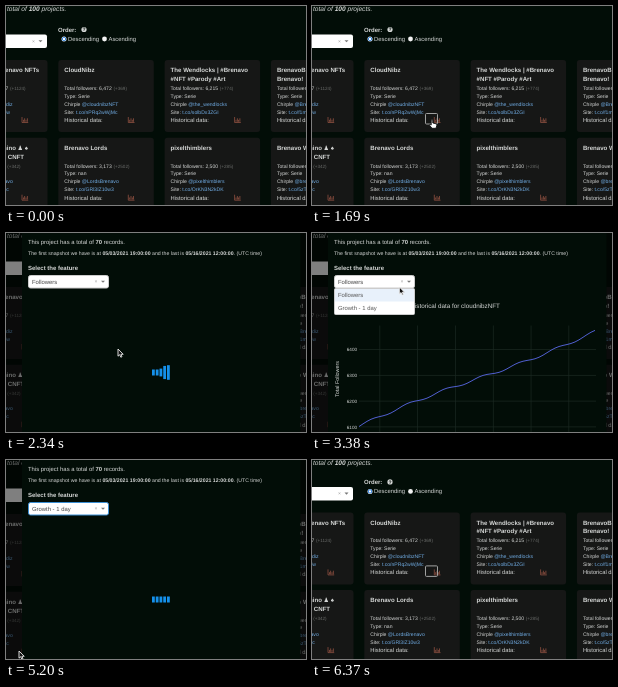
Recreate the animation shown at these times as an HTML page with a canvas. Size 300 by 199 pixels, loop 6500 ms.

```html
<!DOCTYPE html>
<html lang="en">
<head>
<meta charset="utf-8">
<title>Project follower history</title>
<style>
  html, body { margin: 0; width: 100%; height: 100%; overflow: hidden; background: #020d07; }
  canvas { display: block; width: 300px; height: 199px; }
</style>
</head>
<body>
<canvas id="stage"></canvas>
<script>
const W = 300, H = 199, LOOP = 6500, STEP = 130;
const BG = '#020d07', INK = '#d6d8d7', LINK = '#72afe8', LINE = '#505fd0', GRID = '#1b2922';
const FONT = '"Liberation Sans", "DejaVu Sans", sans-serif';
const ratio = Math.max(1, window.devicePixelRatio || 1);

function makeLayer(canvas) {
  canvas.width = W * ratio;
  canvas.height = H * ratio;
  const c = canvas.getContext('2d');
  c.scale(ratio, ratio);
  c.textRendering = 'geometricPrecision';
  return c;
}
const screen = makeLayer(document.getElementById('stage'));
const layer = makeLayer(document.createElement('canvas'));
let g = screen;

const clamp = v => Math.min(1, Math.max(0, v));
const easeOut = p => 1 - (1 - p) ** 2;
const smooth = p => p * p * (3 - 2 * p);
const range = (n, f) => Array.from({ length: n }, (_, i) => f(i));

// ---- drawing helpers ----
function text(s, x, y, size, color = INK, style = '') {
  g.font = `${style} ${size}px ${FONT}`;
  g.fillStyle = color;
  g.fillText(s, x, y);
  return x + g.measureText(s).width;
}
// Parts between asterisks are bold.
function rich(s, x, y, size, style = '') {
  s.split('*').forEach((part, i) => {
    x = text(part, x, y, size, INK, i % 2 ? style + ' bold' : style);
  });
}
function rect(x, y, w, h, color) {
  g.fillStyle = color;
  g.fillRect(x, y, w, h);
}
function round(x, y, w, h, r, fill, stroke) {
  g.beginPath();
  g.roundRect(x, y, w, h, r);
  if (fill) { g.fillStyle = fill; g.fill(); }
  if (stroke) { g.strokeStyle = stroke; g.lineWidth = 1; g.stroke(); }
}
function dot(x, y, r, color) {
  g.beginPath();
  g.arc(x, y, r, 0, 7);
  g.fillStyle = color;
  g.fill();
}
function path(points, color, width) {
  g.beginPath();
  points.forEach(([x, y]) => g.lineTo(x, y));
  g.strokeStyle = color;
  g.lineWidth = width;
  g.lineJoin = 'round';
  g.stroke();
}
function selectIcons(x, y) {
  text('×', x, y + 1.7, 5, '#999');
  g.beginPath();
  g.moveTo(x + 6.5, y - .8);
  g.lineTo(x + 10.5, y - .8);
  g.lineTo(x + 8.5, y + 1.3);
  g.fillStyle = '#777';
  g.fill();
}

// ---- page: two rows of four cards ----
const cards = [
  ['Marketplaces Brenavo NFTs', '', '12,057', '(+1124)', 'Serie', '@brenavolandiz', 't.co/K8mVq41rTw'],
  ['CloudNibz', '', '6,472', '(+369)', 'Serie', '@cloudnibzNFT', 't.co/nPRq2wWjMc'],
  ['The Wendlocks | #Brenavo', '#NFT #Parody #Art', '6,215', '(+774)', 'Serie', '@the_wendlocks', 't.co/solbDx3ZGI'],
  ['BrenavoBarn', 'Brenavo!', '5,208', '', 'Serie', '@BrenavoBarn', 't.co/f1mQz7RkLp'],
  ['The Gallery Brenino ♟ ♠', 'Traders Brenavo CNFT', '3,356', '(+342)', 'Serie', '@clubofbrenavo', 't.co/Wb27xLdync'],
  ['Brenavo Lords', '', '3,173', '(+2502)', 'nan', '@LordsBrenavo', 't.co/GRl3IZ10w3'],
  ['pixelthimblers', '', '2,500', '(+285)', 'Serie', '@pixelthimblers', 't.co/OrKN3N2kDK'],
  ['Brenavo Wharf', '', '2,214', '', 'Serie', '@brenavowharf', 't.co/5zTq8HnVsa'],
];
function chartIcon(x, y) {
  path([[x - 3, y - 3], [x - 3, y + 2.5], [x + 3.2, y + 2.5]], '#8f5040', .8);
  for (let i = 0; i < 4; i++) {
    const h = 2 + i % 2 * 1.5;
    rect(x - 2 + i * 1.3, y + 1.8 - h, .8, h, '#8f5040');
  }
}
function card([title, title2, count, delta, type, user, site], i) {
  g.save();
  g.translate(-54 + i % 4 * 106.3, 54 + (i > 3 ? 77.7 : 0));
  round(0, 0, 95.5, 72, 3, '#161716');
  text(title, 6, 12.4, 6.1, INK, 'bold');
  text(title2, 6, 20.9, 6.1, INK, 'bold');
  const end = text('Total followers: ' + count, 6, 29.8, 5.05);
  text(delta, end + 1.8, 29.8, 4.6, '#6a6c6a');
  text('Type: ' + type, 6, 37.7, 5.05);
  text(user, text('Chirple ', 6, 45.6, 5.1), 45.6, 5.1, LINK);
  text(site, text('Site: ', 6, 53.5, 5.1), 53.5, 5.1, LINK);
  text('Historical data:', 6, 62, 5.8);
  chartIcon(73, 60);
  g.restore();
}
function page(focused, lift) {
  rect(0, 0, W, H, BG);
  rich('total of *100* projects.', 1, 5.2, 6.6, 'italic');
  g.save();
  g.translate(0, -lift);
  text('Order:', 52, 25.8, 6, INK, 'bold');
  dot(78, 23.5, 2.6, INK);
  text('?', 76.6, 25.4, 5, BG, 'bold');
  dot(58, 33, 2.5, '#fff');
  dot(58, 33, 2.1, '#1b73d8');
  dot(58, 33, 1.2, '#fff');
  text('Descending', 62, 35, 5.9);
  dot(98.5, 33, 2.4, '#f2f2f2');
  text('Ascending', 102.5, 35, 5.9);
  round(-60, 28.5, 101, 13.5, 2, '#fff');
  selectIcons(26, 35);
  cards.forEach(card);
  if (focused) round(113.5, 107.5, 12, 10.5, 1, null, '#a0a1a0');
  g.restore();
}

// ---- charts ----
const noise = i => Math.abs(Math.sin(i * 12.9898) * 43758.5453) % 1;
const totals = range(60, i => {
  const x = 47 + i * 4;
  return [x, 193 - .4 * (x - 47) - 2 * Math.sin((x - 47) / 37.7) - 1.3 * Math.cos((x - 133) / 5.9)];
});
const early = range(31, i => [40 + i * 1.33, noise(i + 1) ** 3 * 8 - 1]);
const daily = [27, 8, 24, 20, 7, 6, 21, 14, 17, 13, 11, 14, 11, 14, 11, 11, 11, 24, 18, 17]
  .map((v, i) => [102 + i * 9.58, v]);
const growth = [...early, ...daily].map(([x, v]) => [x, 187.5 - v * 3.32]);

function chart(label, points, firstX, ticks, top, gap) {
  const left = points[0][0];
  text('Total Chirple followers Historical data for cloudnibzNFT', 35, 74.5, 6.3);
  for (let i = 0; i < 6; i++) rect(firstX + i * 37.8, 92.5, .7, 110, GRID);
  g.textAlign = 'right';
  ticks.forEach((name, i) => {
    const y = top + i * gap;
    rect(left, y - .35, 284 - left, .7, name ? GRID : '#dfe3e1');
    text(name, left - 2, y + 1.7, 4.6);
  });
  g.textAlign = 'center';
  for (let i = 0; i < 6; i++) text('May ' + (5 + 2 * i), firstX + i * 37.8, 203.5, 4.6);
  g.save();
  g.translate(27, 146);
  g.rotate(-Math.PI / 2);
  text(label, 0, 0, 5.4);
  g.restore();
  g.textAlign = 'left';
  path(points, LINE, 1);
}
const totalChart = () =>
  chart('Total Followers', totals, 67.5, range(4, i => 6400 - i * 100), 116.5, 25.8);
const growthChart = () =>
  chart('Followers since last measurement', growth, 64, range(6, i => 25 - i * 5), 104.5, 16.6);

// ---- loading bars: 1.2 s cycle, each bar 0.1 s behind the last ----
function spinner(age) {
  for (let i = 0; i < 5; i++) {
    const p = (age - i * 100 + 1200) % 1200 / 240;
    const h = 15 * (.4 + .6 * smooth(clamp(1 - Math.abs(p - 1))));
    rect(146 + i * 3.75, 139.5 - h / 2, 2.8, h, '#1590ea');
  }
}

// ---- dialog ----
const OPEN = 1730, LOADED = 2860, LIST = 3380, PICK = 3770, RELOAD = 4160, RELOADED = 5400, CLOSE = 5686;

function dialog(t) {
  rect(16, -30, 278.5, 260, BG);
  rich('This project has a total of *70* records.', 22, 11, 5.9);
  rich('The first snapshot we have is at *05/03/2021 19:00:00* and the last is *05/16/2021 12:00:00*. (UTC time)',
    22, 22, 5.2);
  text('Select the feature', 22, 36.5, 6, INK, 'bold');

  if (t < LOADED) spinner(t - OPEN);
  else if (t < RELOAD) totalChart();
  else if (t < RELOADED) spinner(t - RELOAD);
  else growthChart();

  const focused = t >= RELOAD && t < RELOADED;
  round(22.5, 42.5, 80, 12.5, 2, '#fff', focused ? '#3b8fd4' : '#ccc');
  text(t < PICK ? 'Followers' : 'Growth - 1 day', 26, 50.7, 5.9, '#444');
  selectIcons(88.5, 48.5);
  if (t >= LIST && t < PICK) {
    round(22.5, 55.5, 80, 26, 1, '#fff', '#ccc');
    rect(23, t < 3600 ? 56 : 69, 79, 12.5, '#e8f1fb');
    text('Followers', 26, 64.2, 5.9, '#555');
    text('Growth - 1 day', 26, 77.2, 5.9, '#555');
  }
}

// ---- pointer: stops as arrival time, x, y ----
const TRAVEL = 520;
const stops = [[1300, 120, 114], [2340, 112, 116], [3250, 90, 50], [PICK, 73, 75],
  [5070, 13, 191], [5720, 8, 183], [6240, -12, 180]];
const arrow = new Path2D('M0 0V7.2L1.7 5.7L2.8 8.2L4 7.7L2.9 5.3H5.2Z');
const hand = new Path2D('M-.8 0Q0-1 .8 0V3L4 3.8Q5 4 4.8 5.5L4 8.3H0L-2.6 5Q-2.6 4-1.6 4.4L-.8 5Z');

function pointer(t) {
  let x = 150, y = -14;
  for (const [arrive, toX, toY] of stops) {
    const p = smooth(clamp(1 + (t - arrive) / TRAVEL));
    x += (toX - x) * p;
    y += (toY - y) * p;
  }
  const pointing = t >= 1300 && t < 1820;
  const shape = pointing ? hand : arrow;
  g.save();
  g.translate(x, y);
  g.lineWidth = .9;
  g.fillStyle = pointing ? '#fff' : '#111';
  g.strokeStyle = pointing ? '#111' : '#eee';
  g.fill(shape);
  g.stroke(shape);
  g.restore();
}

// ---- timeline ----
function draw(t) {
  g = screen;
  page(t >= 1690, t >= 6370 ? 1.6 : 0);
  const closing = t >= CLOSE, age = t - (closing ? CLOSE : OPEN);
  const fade = clamp(age / 150), slide = easeOut(clamp(age / 300));
  const alpha = closing ? 1 - fade : fade;
  if (alpha > 0) {
    rect(0, 0, W, H, `rgba(0, 0, 0, ${alpha / 2})`);
    g = layer;
    g.clearRect(0, 0, W, H);
    g.save();
    g.translate(0, -18 * (closing ? slide : 1 - slide));
    dialog(t);
    g.restore();
    g = screen;
    g.globalAlpha = alpha;
    g.drawImage(layer.canvas, 0, 0, W, H);
    g.globalAlpha = 1;
  }
  pointer(t);
}

const start = performance.now();
function tick(now) {
  const t = Math.max(0, now - start) % LOOP;
  draw(Math.floor(t / STEP) * STEP);
  requestAnimationFrame(tick);
}
tick(start);
</script>
</body>
</html>
```
